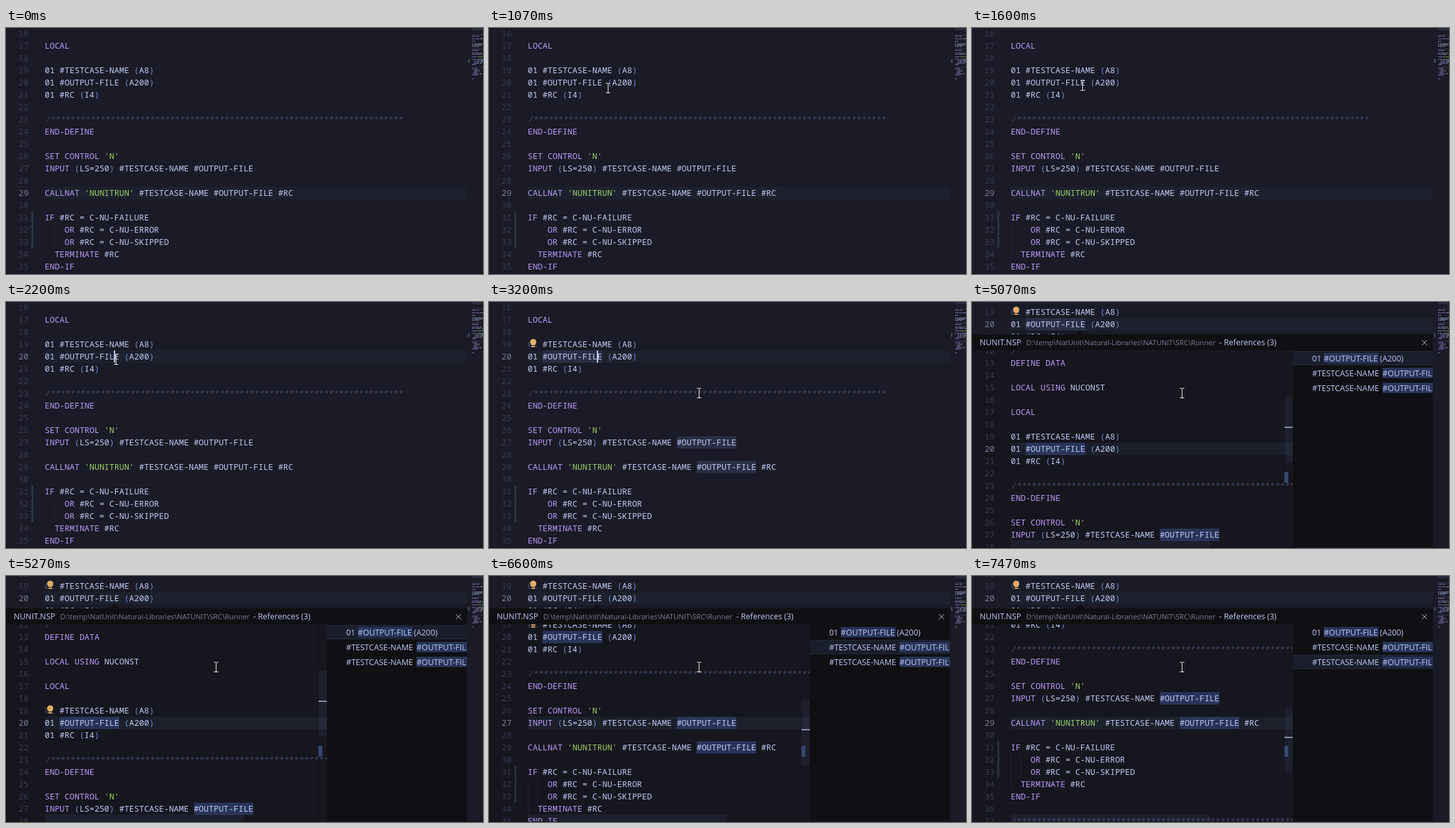
An HTML page with a canvas that plays this animation: 739 px wide and 381 px high, repeating every 8 s.

```html
<!DOCTYPE html>
<html>
<head>
<meta charset="utf-8">
<style>
html, body { margin: 0; width: 100%; height: 100%; overflow: hidden; background: #1a1b26; }
canvas { display: block; }
</style>
</head>
<body>
<canvas id="stage" width="739" height="381"></canvas>
<script>
const ctx = document.getElementById('stage').getContext('2d');
const LOOP = 8000, CHAR = 7.697, LINE = 19, LEFT = 60;
const MONO = '12.83px "Noto Sans Mono", monospace';
const UI = '"Open Sans", "Noto Sans", sans-serif';
const C = {
  bg: '#1a1b26', peek: '#16161e', panel: '#101014', line: '#1d212d',
  text: '#c0caf5', keyword: '#bb9af7', string: '#9ece6a', comment: '#444b6a',
  paren: '#698cd6', num: '#363b54', numOn: '#787c99',
  word: '#2a2f45', ref: '#283459'
};
const NAME = '#OUTPUT-FILE';
const RULE = '/' + '*'.repeat(71);
const FIRST = 7;
const LINES = [
  '/* Runs a test case', '/* and writes output', '', '', '', RULE,
  'DEFINE DATA', '', 'LOCAL USING NUCONST', '', 'LOCAL', '',
  '01 #TESTCASE-NAME (A8)', '01 #OUTPUT-FILE (A200)', '01 #RC (I4)', '',
  RULE, 'END-DEFINE', '', "SET CONTROL 'N'",
  'INPUT (LS=250) #TESTCASE-NAME #OUTPUT-FILE', '',
  "CALLNAT 'NUNITRUN' #TESTCASE-NAME #OUTPUT-FILE #RC", '',
  'IF #RC = C-NU-FAILURE', '    OR #RC = C-NU-ERROR', '    OR #RC = C-NU-SKIPPED',
  '  TERMINATE #RC', 'END-IF', '', RULE,
  'ON ERROR', '  IF #RC = 0', '    #RC := 1', '  END-IF', '  TERMINATE #RC', 'END-ERROR',
  '', '', 'END'
];
const KEYWORDS = new Set(('DEFINE DATA LOCAL USING END-DEFINE SET CONTROL INPUT CALLNAT ' +
  'IF OR TERMINATE END-IF ON ERROR END-ERROR END').split(' '));

function tokens(s) {
  if (s[0] === '/') return [{ s, col: 0, color: C.comment }];
  return [...s.matchAll(/'[^']*'|[()]|[^\s()']+/g)].map(m => ({
    s: m[0], col: m.index,
    color: m[0][0] === "'" ? C.string : /[()]/.test(m[0]) ? C.paren
      : KEYWORDS.has(m[0]) ? C.keyword : C.text
  }));
}
const ROWS = LINES.map((s, i) => ({ n: FIRST + i, s, toks: tokens(s), mark: s.indexOf(NAME) }));

function rect(x, y, w, h, color) {
  ctx.fillStyle = color;
  ctx.fillRect(x, y, w, h);
}
function text(s, x, y, color, font) {
  ctx.font = font;
  ctx.fillStyle = color;
  ctx.fillText(s, x, y);
}
function clip(x, y, w, h, draw) {
  ctx.save();
  ctx.beginPath();
  ctx.rect(x, y, w, h);
  ctx.clip();
  draw();
  ctx.restore();
}

function bulb(y, bg) {
  ctx.globalAlpha = .7;
  rect(60, y, 15, 15, bg);
  ctx.globalAlpha = 1;
  ctx.fillStyle = '#e0af68';
  ctx.beginPath();
  ctx.arc(68.5, y + 6, 4.8, 0, 7);
  ctx.fill();
  rect(66, y + 9, 5, 5, '#e0af68');
  rect(66, y + 11, 5, 1, bg);
}

// Code rows, with row `active` highlighted and its top edge at `top`
function editor(active, top, o) {
  const yOf = n => top + LINE * (n - active);
  rect(LEFT, top, o.right - LEFT, LINE, o.lineColor || C.line);
  for (const { n, toks, mark } of ROWS) {
    const y = yOf(n);
    if (y < o.y - LINE || y > 381) continue;
    const num = String(n);
    text(num, 35 - num.length * CHAR, y + 14, n === active ? C.numOn : C.num, MONO);
    if (mark >= 0 && o.word) rect(LEFT + mark * CHAR, y, NAME.length * CHAR, LINE, o.word);
    if (n >= 32 && n <= 34) rect(60, y, 1, LINE, '#232433');
    if (n === 32 || n === 33) rect(75, y, 1, LINE, '#232433');
    if (n >= 31 && n <= 33)
      for (let k = 0; k < LINE; k++) rect(39 + (3 - (k + n) % 4 + 4) % 4 * .75, y + k, 1.4, 1, '#3b5368');
    for (const t of toks)
      text(t.s, LEFT + t.col * CHAR, y + 14, t.color, (t.color === C.comment ? 'italic ' : '') + MONO);
  }
  if (o.bulb) bulb(yOf(19), o.bg);
}

function minimap(marked) {
  rect(714, 0, 25, 381, C.bg);
  for (const { n, toks, mark } of ROWS) {
    const y = 48 + 2 * (n - 31);
    if (marked && mark >= 0) rect(722 + mark, y, NAME.length, 2, C.word);
    ctx.globalAlpha = .5;
    for (const t of toks) rect(722 + t.col, y, t.s.length, 1.3, t.color);
    ctx.globalAlpha = 1;
  }
  rect(716, 48, 2, 6, '#3b5368');
}

function peek(sel, showBulb) {
  const active = [20, 27, 29][sel];
  rect(0, 50, 714, 330, C.panel);
  ctx.beginPath();
  ctx.moveTo(160, 50);
  ctx.lineTo(167.5, 43.5);
  ctx.lineTo(175, 50);
  ctx.fill();

  text('NUNIT.NSP', 12, 67, C.text, '12.4px ' + UI);
  text('D:\\temp\\NatUnit\\Natural-Libraries\\NATUNIT\\SRC\\Runner', 84, 67, C.numOn, '11.07px ' + UI);
  text('- References (3)', 383, 67, C.text, '12.4px ' + UI);
  ctx.strokeStyle = '#a9b1d6';
  ctx.lineWidth = 1;
  ctx.beginPath();
  ctx.moveTo(697, 59); ctx.lineTo(705, 67);
  ctx.moveTo(705, 59); ctx.lineTo(697, 67);
  ctx.stroke();

  clip(0, 75, 497, 305, () => {
    rect(0, 75, 497, 305, C.peek);
    editor(active, 218, { y: 75, right: 497, word: C.ref, bulb: showBulb, bg: C.peek, lineColor: '#1b202b' });
    const mark = 194 + (active - 20) * 6.25;
    rect(484, 75, 1, 305, '#101014');
    rect(484, Math.round(mark - 47), 13, 102, 'rgba(134,139,196,.08)');
    rect(484, 263, 6, 17, '#34476f');
    rect(484, Math.round(mark) - 1, 13, 2, '#8d93ae');
    rect(60, 369, 309, 12, 'rgba(134,139,196,.08)');
  });

  clip(497, 75, 217, 305, () => {
    const top = 76 + 23 * sel;
    rect(497, top, 217, 22, '#1a1e2b');
    rect(497, top, 217, 1, '#252b3c');
    rect(497, top + 21, 217, 1, '#252b3c');
    const font = '12.4px ' + UI;
    for (let i = 0; i < 3; i++) {
      const y = 92 + 23 * i, x = i ? 636 : 545;
      rect(x, y - 13, 85, 16, C.ref);
      text(i ? '#TESTCASE-NAME' : '01', 527, y, C.text, font);
      text(NAME, x, y, C.text, font);
      if (!i) text('(A200)', 632, y, C.text, font);
    }
  });
}

// Mouse path: time, x, y
const PATH = [
  [70, 732, 372], [270, 640, 250], [470, 500, 110], [670, 350, 30], [800, 250, 48],
  [930, 212, 76], [1070, 184, 93], [1330, 174, 91], [1600, 171, 89],
  [1930, 170, 89], [2670, 170, 89], [2860, 222, 104], [3030, 296, 132], [3200, 325, 141]
];
function mouse(t) {
  if (t < PATH[0][0]) return;
  const i = PATH.findIndex(p => p[0] > t);
  let [, x, y] = PATH[i < 0 ? PATH.length - 1 : i];
  if (i > 0) {
    const [t0, x0, y0] = PATH[i - 1], k = (t - t0) / (PATH[i][0] - t0);
    x = x0 + (x - x0) * k;
    y = y0 + (y - y0) * k;
  }
  x = Math.round(x);
  y = Math.round(y);
  const shape = (d, color) => {
    rect(x - d, y - 7 - d, 1 + 2 * d, 15 + 2 * d, color);
    for (const end of [-8, 7]) {
      rect(x - 3 - d, y + end - d, 3 + 2 * d, 1 + 2 * d, color);
      rect(x + 1 - d, y + end - d, 3 + 2 * d, 1 + 2 * d, color);
    }
  };
  shape(.5, 'rgba(0,0,0,.5)');
  shape(0, '#fff');
}

function draw(t) {
  const open = t >= 5070, marked = t >= 2470;
  const active = t < 2200 ? 29 : 20;
  rect(0, 0, 739, 381, C.bg);
  clip(0, 0, 714, 380, () => editor(active, active === 29 ? 246 : open ? 25 : 75, {
    y: 0, right: 714, word: marked && t < 5130 && C.word, bulb: marked, bg: C.bg
  }));
  const caretOn = [2200, 3200, 4200].some((on, i) => t >= on && t < [2730, 3730, 4670][i]);
  if (caretOn) rect(167, 75, 2, LINE, C.text);
  minimap(marked);
  if (open) peek(t < 6600 ? 0 : t < 7470 ? 1 : 2, t >= 5270 && t < 6870);
  rect(0, 380, 739, 1, '#17111d');
  mouse(t);
}

let start;
function frame(now) {
  start ??= now;
  draw((now - start) % LOOP);
  requestAnimationFrame(frame);
}
draw(0);
requestAnimationFrame(frame);
</script>
</body>
</html>
```
